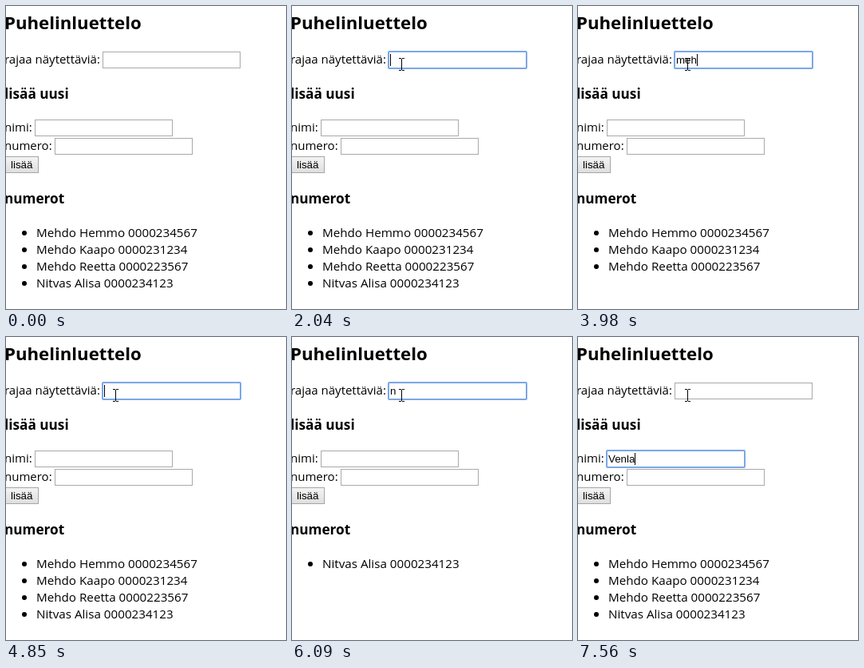
Recreate the animation shown at these times as an HTML page. Size 351 by 379 pixels, loop 8 s.

```html
<!DOCTYPE html>
<html lang="fi">
<head>
<meta charset="utf-8">
<title>Puhelinluettelo</title>
<style>
  html, body { margin: 0; width: 100%; height: 100%; overflow: hidden; background: #fff; }
  svg { display: block; width: 100%; height: 100%; }
  text { font-family: "Open Sans", "Noto Sans", sans-serif; font-size: 15.2px; }
  .label { font-size: 15px; }
  .heading { font-weight: 700; font-size: 17.2px; }
  .title { font-size: 22.2px; }
  .control { font-family: "Liberation Sans", Arial, sans-serif; font-size: 13.333px; }
  .box { fill: #fff; stroke: #a9a9a9; }
  .ring { fill: none; stroke: #7ba7e6; stroke-width: 2; }
</style>
</head>
<body>
<svg id="stage" viewBox="0 0 351 379">
  <defs>
    <linearGradient id="face" x2="0" y2="1">
      <stop stop-color="#f4f4f4"/><stop offset="1" stop-color="#dedede"/>
    </linearGradient>
  </defs>
  <text class="heading title" x="-2" y="29">Puhelinluettelo</text>
  <text class="label" x="-2" y="72">rajaa näytettäviä:</text>
  <text class="heading" x="-2" y="116">lisää uusi</text>
  <text class="label" x="-2" y="157">nimi:</text>
  <text class="label" x="-2" y="180">numero:</text>
  <rect x="-1.5" y="188.5" width="42" height="20" fill="url(#face)" stroke="#a6a6a6"/>
  <text class="control" x="6" y="203">lisää</text>
  <text class="heading" x="-2" y="247">numerot</text>
</svg>
<script>
const LOOP = 8000;
const stage = document.getElementById('stage');

const PEOPLE = [
  'Mehdo Hemmo 0000234567',
  'Mehdo Kaapo 0000231234',
  'Mehdo Reetta 0000223567',
  'Nitvas Alisa 0000234123'
];

// [time, typed text, caret visible]
const FILTER_STEPS = [
  [0, '', false], [960, '', true], [1490, '', false], [2040, '', true],
  [2120, 'm', true], [2350, 'me', true], [2500, 'meh', true],
  [2670, 'mehd', true], [2740, 'mehdo', true], [3290, 'mehdo', false],
  [3750, 'mehdo', true], [3830, 'mehd', true], [3980, 'meh', true],
  [4150, 'me', true], [4300, 'm', true], [4380, '', true],
  [4450, '', false], [4850, '', true],
  [5080, 'n', true], [5150, 'ni', true], [5400, 'nit', true],
  [5550, 'nitv', true], [5780, 'nit', true], [5930, 'ni', true],
  [6010, 'n', true], [6090, 'n', false], [6320, '', false]
];
const NAME_STEPS = [
  [0, '', false], [6550, '', true], [6930, 'V', true],
  [7160, 'Ve', true], [7390, 'Venl', true], [7560, 'Venla', true]
];

function add(tag, attributes, parent = stage) {
  const node = document.createElementNS('http://www.w3.org/2000/svg', tag);
  for (const key in attributes) node.setAttribute(key, attributes[key]);
  return parent.appendChild(node);
}

const show = (node, visible) => node.setAttribute('visibility', visible ? 'visible' : 'hidden');
const stepAt = (steps, t) => steps.findLast(step => step[0] <= t);

function makeField(x, y) {
  add('rect', { class: 'box', x: x + .5, y: y + .5, width: 172, height: 20 });
  const ring = add('rect', { class: 'ring', x, y, width: 173, height: 21, rx: 1 });
  const label = add('text', { class: 'control', x: x + 2, y: y + 15 });
  const caret = add('rect', { y: y + 3, width: 1, height: 15 });
  return (focused, text, caretOn) => {
    show(ring, focused);
    label.textContent = text;
    const width = text ? label.getComputedTextLength() : 0;
    caret.setAttribute('x', Math.round(x + 2 + width));
    show(caret, caretOn);
  };
}

const drawFilter = makeField(121, 57);
const drawName = makeField(36, 142);
makeField(61, 165)(false, '', false);

const rows = PEOPLE.map((_, i) => {
  const row = add('g', {});
  add('circle', { cx: 23, cy: 284 + 21 * i, r: 3 }, row);
  return { row, label: add('text', { x: 38, y: 289 + 21 * i }, row) };
});

const pointer = add('g', {});
const arrow = add('path', {
  d: 'M.5 .5V16.5L4.3 13L6.8 18.7L9 17.7L6.6 12.2H11.8Z', fill: '#fff', stroke: '#000'
}, pointer);
const beam = add('path', {
  d: 'M-3 -7.5H0M1 -7.5H4M-3 7.5H0M1 7.5H4M.5 -7V7',
  fill: 'none', stroke: '#000', 'shape-rendering': 'crispEdges'
}, pointer);

function drawPointer(t) {
  show(pointer, t >= 260);
  const progress = Math.min(1, Math.max(0, Math.floor((t - 260) / 75.7) / 7));
  const left = 1 - progress;
  const x = Math.round(137 + 167 * left ** 1.5);
  let y = Math.round(73 + 279 * left ** 2 - 90 * progress ** 2 * left);
  if (t >= 960 && t < 1030) y += 3;
  const overField = x > 121 && x < 294 && y > 57 && y < 78;
  pointer.setAttribute('transform', `translate(${x} ${y})`);
  arrow.setAttribute('display', overField ? 'none' : 'inline');
  beam.setAttribute('display', overField ? 'inline' : 'none');
}

function draw(t) {
  const [, query, filterCaret] = stepAt(FILTER_STEPS, t);
  const [, name, nameCaret] = stepAt(NAME_STEPS, t);
  drawFilter(t >= 960 && t < 6550, query, filterCaret);
  drawName(t >= 6550, name, nameCaret);

  const matches = PEOPLE.filter(person => person.toLowerCase().includes(query));
  rows.forEach(({ row, label }, i) => {
    show(row, i < matches.length);
    label.textContent = matches[i] || '';
  });
  drawPointer(t);
}

const start = performance.now();
function tick() {
  draw((performance.now() - start) % LOOP);
  requestAnimationFrame(tick);
}
tick();
</script>
</body>
</html>
```
